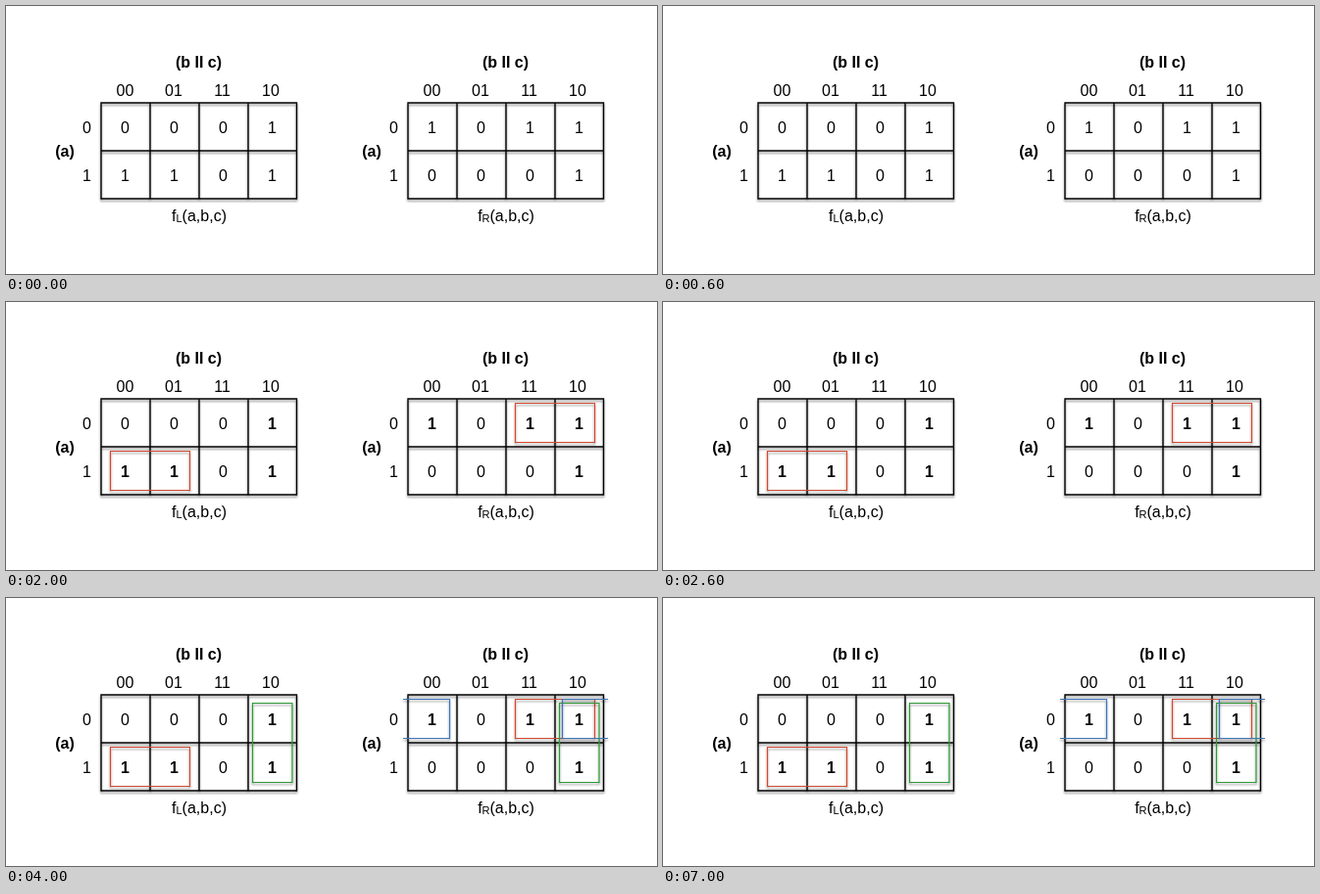
An HTML page for the animation above (9 s loop, 664 by 274 pixels).

```html
<!DOCTYPE html>
<html lang="en">
<head>
<meta charset="utf-8">
<title>Two Karnaugh maps</title>
<style>
  html, body { margin: 0; width: 100%; height: 100%; overflow: hidden; background: #fff; }
  svg { display: block; width: 664px; height: 274px; }
  text { font: 16px "Liberation Sans", Arial, sans-serif; text-anchor: middle; }
  .bold { font-weight: bold; }
  .sub { font-size: 11px; }
  path { fill: none; stroke-width: 1.2; }
  .grid { stroke: #000; stroke-width: 1.4; }
</style>
</head>
<body>
<svg id="stage" viewBox="0 0 664 274">
  <defs>
    <filter id="shadow" filterUnits="userSpaceOnUse" x="0" y="0" width="664" height="274">
      <feDropShadow dx="0" dy="2" stdDeviation="1.3" flood-color="#000" flood-opacity=".45"/>
    </filter>
  </defs>
</svg>
<script>
const stage = document.getElementById('stage');
const LOOP = 9000, STEP = 1000, LAST = 4;
const RED = '#d2482e', GREEN = '#2f9a35', BLUE = '#3d74ba';
const ones = [], groups = [];

function add(tag, attrs, content = '') {
  const el = document.createElementNS('http://www.w3.org/2000/svg', tag);
  for (const key in attrs) el.setAttribute(key, attrs[key]);
  el.innerHTML = content;
  return stage.appendChild(el);
}

const label = (x, y, content, cls = '') => add('text', { x, y, class: cls }, content);

function drawMap(left, name, rows) {
  add('path', {
    class: 'grid', filter: 'url(#shadow)',
    d: `M${left} 99h199.5v98h-199.5zm0 49h199.5M${left + 50} 99v98m50-98v98m50-98v98`
  });
  label(left + 99.5, 63, '(b II c)', 'bold');
  label(left - 37, 154, '(a)', 'bold');
  label(left + 100, 220, `f<tspan class="sub" dy="1">${name}</tspan><tspan dy="-1">(a,b,c)</tspan>`);
  ['00', '01', '11', '10'].forEach((code, col) => label(left + 24.5 + col * 49.5, 91.5, code));
  rows.forEach((row, r) => {
    const y = 129.5 + r * 49;
    label(left - 14.5, y, r);
    [...row].forEach((bit, col) => {
      const cell = label(left + 24.5 + col * 50, y, bit);
      if (bit === '1') ones.push(cell);
    });
  });
}

function group(step, stroke, d) {
  groups.push({ step, el: add('path', { stroke, d, filter: 'url(#shadow)' }) });
}

drawMap(97, 'L', ['0001', '1101']);
drawMap(410, 'R', ['1011', '0001']);

group(2, RED, 'M106.5 152.5h81v40h-81z');
group(2, RED, 'M519.5 103.5h81v40h-81z');
for (const x of [251.5, 564.5]) group(3, GREEN, `M${x} 107.5h40.5v81h-40.5z`);
// This pair wraps around the sides of the map.
group(4, BLUE, 'M405 103.5h47.5v40h-47.5');
group(4, BLUE, 'M614 103.5h-46.5v40h46.5');

function draw(now) {
  const step = Math.min(LAST, Math.floor(now % LOOP / STEP));
  for (const cell of ones) cell.classList.toggle('bold', step >= 1);
  for (const g of groups) g.el.style.display = step >= g.step ? '' : 'none';
}

const start = performance.now();
function tick() {
  draw(performance.now() - start);
  requestAnimationFrame(tick);
}
tick();
</script>
</body>
</html>
```
